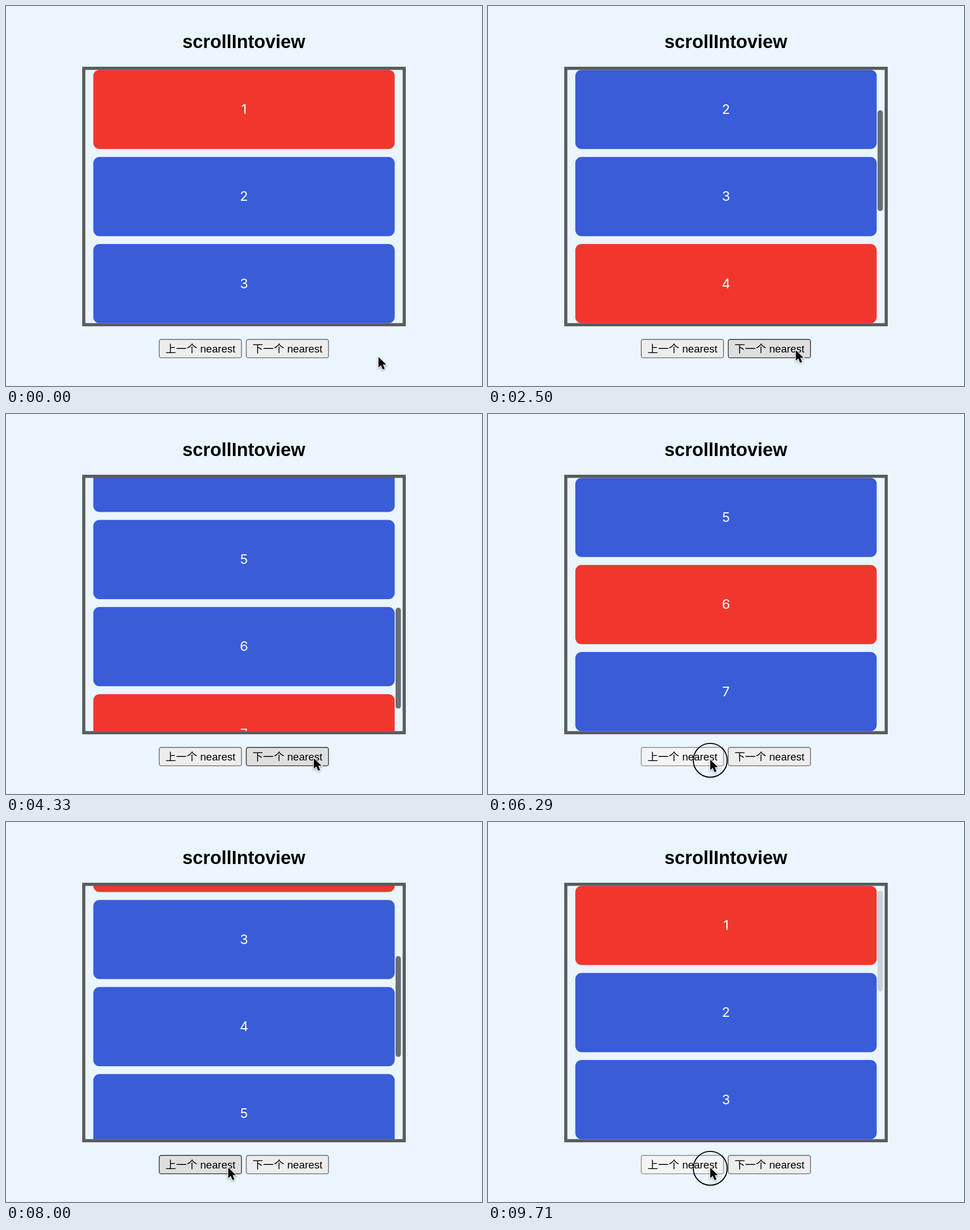
Animation of 837 by 669 pixels, one loop 9.75 s. Source, as an HTML page:

```html
<!DOCTYPE html>
<html lang="zh">
<head>
<meta charset="utf-8">
<title>scrollIntoview</title>
<style>
  html, body { margin: 0; width: 100%; height: 100%; overflow: hidden; background: #eaf5fd; }
  svg { display: block; font-family: "Liberation Sans", Arial, "Noto Sans CJK SC", "Noto Sans CJK", sans-serif; text-anchor: middle; }
  h1, .title { font-size: 32.4px; font-weight: bold; }
  .item rect { fill: #395cd9; }
  .item.on rect { fill: #f1372d; }
  .item text { fill: #fff; font: 23.5px Inter, sans-serif; }
  .button rect { fill: #ededed; stroke: #666a70; stroke-width: 1.4; }
  .button.hover rect { fill: #dfdfdf; stroke: #2f3238; }
  .button.active rect { fill: #f4f4f4; stroke: #8a8d90; }
  .button text { font-size: 18.6px; }
  #cursor { filter: drop-shadow(0 1.5px 1.5px #0006); }
</style>
</head>
<body>
<svg width="837" height="669" viewBox="0 0 837 669">
  <clipPath id="view"><rect x="139.5" y="112" width="558" height="446.5"/></clipPath>
  <text class="title" x="418.3" y="73.5">scrollIntoview</text>
  <g clip-path="url(#view)">
    <g id="list"></g>
    <rect id="bar" x="685" width="9.4" height="177.5" rx="4.7" fill="#6a6f76"/>
  </g>
  <rect x="136.8" y="109.7" width="563.4" height="451.4" fill="none" stroke="#5a5b5d" stroke-width="5.5"/>
  <g class="button">
    <rect x="269.5" y="587" width="144.6" height="32.4" rx="3.5"/>
    <text x="342" y="609.5">上一个 nearest</text>
  </g>
  <g class="button">
    <rect x="422.5" y="587" width="144.6" height="32.4" rx="3.5"/>
    <text x="495" y="609.5">下一个 nearest</text>
  </g>
  <g id="cursor">
    <path d="M0 0V18.5L4.3 14.5 7.6 22 11 20.5 7.8 13.3H13.6Z" stroke="#fff" stroke-width="2.4" paint-order="stroke"/>
  </g>
  <circle id="ring" r="29.8" fill="none" stroke="#000" stroke-width="1.9"/>
</svg>
<script>
const LOOP = 9750, PITCH = 153.35, TOP = 112.4;
const HOLD = 143, SCROLL = 370, FADE_DELAY = 530, FADE = 170;
const $ = id => document.getElementById(id);
const buttons = [...document.querySelectorAll('.button')];

// press time, index of the item it selects
const clicks = [
  [560, 1], [1170, 2], [1880, 3], [2565, 4], [3290, 5], [4000, 6],
  [5500, 5], [6210, 4], [6630, 3], [7075, 2], [7750, 1], [8540, 0], [9580, 0]
];

// start, end, x, y
const moves = [[0, 0, 655, 618], [20, 520, 541.3, 606], [4810, 5400, 390.8, 608.5]];

$('list').innerHTML = Array.from({ length: 7 }, (_, i) => `
  <g class="item" transform="translate(0 ${TOP + i * PITCH})">
    <rect x="153.5" width="530" height="139.4" rx="11"/>
    <text x="418.5" y="77.6">${i + 1}</text>
  </g>`).join('');
const items = [...$('list').children];

const clamp = x => Math.min(1, Math.max(0, x));
const easeIn = x => Math.pow(2 * x, 2.1) / 2;
const ease = x => x < .5 ? easeIn(x) : 1 - easeIn(1 - x);

function cursorAt(t) {
  let [, , x, y] = moves[0];
  for (const [start, end, toX, toY] of moves.slice(1)) {
    const k = ease(clamp((t - start) / (end - start)));
    x += (toX - x) * k;
    y += (toY - y) * k;
  }
  return [x, y];
}

function listAt(t) {
  let selected = 0, top = 0, scroll = 0, barOpacity = 0;
  for (const [press, index] of clicks) {
    const age = t - press - HOLD;
    if (age < 0) break;
    selected = index;
    // "nearest": scroll only as far as needed to show the item
    const next = Math.max(index - 2, Math.min(index, top));
    if (next !== top) {
      scroll = top + (next - top) * ease(clamp(age / SCROLL));
      barOpacity = 1 - clamp((age - SCROLL - FADE_DELAY) / FADE);
      top = next;
    }
  }
  return { selected, scroll: scroll * PITCH, barOpacity };
}

function draw(t) {
  const { selected, scroll, barOpacity } = listAt(t);
  items.forEach((item, i) => item.classList.toggle('on', i === selected));
  $('list').setAttribute('transform', `translate(0 ${-scroll})`);
  $('bar').setAttribute('y', 121 + scroll * .408);
  $('bar').setAttribute('opacity', barOpacity);

  const [x, y] = cursorAt(t);
  $('cursor').setAttribute('transform', `translate(${x} ${y})`);
  const pressed = delay => clicks.some(([press]) => t >= press + delay && t < press + HOLD);
  $('ring').setAttribute('transform', `translate(${x} ${y + 1.2})`);
  $('ring').setAttribute('visibility', pressed(0) ? 'visible' : 'hidden');

  buttons.forEach((button, i) => {
    const left = 269 + 153 * i;
    const hover = x > left && x < left + 146 && y > 586 && y < 620;
    button.classList.toggle('hover', hover);
    button.classList.toggle('active', hover && pressed(20));
  });
}

function frame() {
  draw(performance.now() % LOOP);
  requestAnimationFrame(frame);
}
frame();
</script>
</body>
</html>
```
